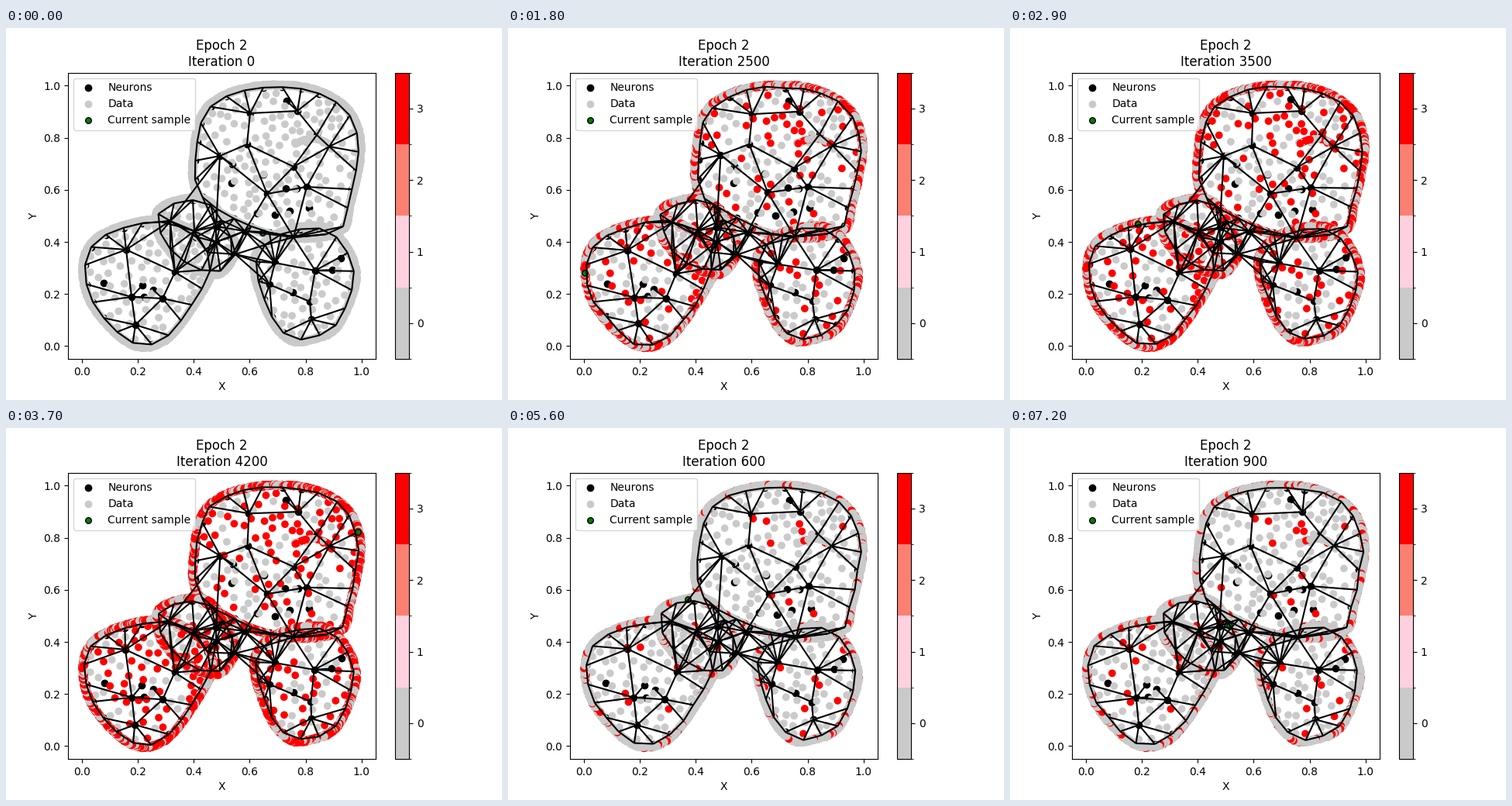
These frames come from a looping animation (640 by 480 pixels, 7300 ms). A matplotlib script:

```python
import numpy as np
import matplotlib.pyplot as plt
from matplotlib.animation import FuncAnimation
from matplotlib.cm import ScalarMappable
from matplotlib.collections import LineCollection
from matplotlib.colors import BoundaryNorm, ListedColormap, to_rgba
from matplotlib.path import Path

GRAY, RED = "#cacaca", "#ff0000"
TOTAL = 7300
rng = np.random.default_rng(4)


def pairs(text):
    return np.array([w.split(",") for w in text.split()], float)


# Key points in stage pixels.
BLOBS = [pairs(s) for s in (
    "250,220 242,155 258,102 310,76 385,75 440,102 459,152 446,225 428,266 340,268",
    "98,305 122,266 193,246 245,264 268,305 247,353 205,405 160,409 111,360",
    "193,238 222,221 262,222 290,262 297,290 274,319 230,306 200,275",
    "319,300 350,264 408,255 440,281 453,325 430,384 400,402 364,403 335,365",
)]
HUBS = pairs("276,165 315,110 311,150 337,214 376,107 401,138 417,153 371,179 388,205 "
             "371,270 308,262 155,286 162,347 202,349 167,383 218,315 243,262 271,256 "
             "271,276 296,292 212,249 347,303 399,313 392,353 394,376 340,331")
STRAYS = pairs("291,200 292,176 332,189 361,207 375,207 366,236 347,241 324,239 362,94 "
               "391,232 178,347 190,338 176,332 126,329 370,341 421,312 432,297")


def to_data(p):
    """Stage pixels to axis units."""
    return np.stack([(p[..., 0] - 98.04) / 360.73, (410.4 - p[..., 1]) / 336], -1)


def distances(a, b):
    return np.linalg.norm(a[:, None] - b[None], axis=-1)


# ---- curves ----

def smooth_loop(pts, steps=30):
    """Closed Catmull-Rom curve."""
    b = pts[:, None]
    a, c, d = np.roll(b, 1, 0), np.roll(b, -1, 0), np.roll(b, -2, 0)
    t = np.linspace(0, 1, steps, endpoint=False)[None, :, None]
    curve = b + .5 * ((c - a) * t + (2 * a - 5 * b + 4 * c - d) * t**2
                      + (3 * b - a - 3 * c + d) * t**3)
    curve = curve.reshape(-1, 2)
    return np.vstack([curve, curve[:1]])


def arc_lengths(curve):
    return np.r_[0, np.cumsum(np.hypot(*np.diff(curve, axis=0).T))]


def at_lengths(curve, u):
    s = arc_lengths(curve)
    return np.stack([np.interp(u, s, curve[:, k]) for k in (0, 1)], -1)


def inset(p, curve, depth):
    inward = curve.mean(0) - p
    return p + depth * inward / np.linalg.norm(inward, axis=1, keepdims=True)


curves = [smooth_loop(b) for b in BLOBS]
lengths = np.array([arc_lengths(c)[-1] for c in curves])

# ---- data cloud: dense rims, sparse interiors ----


def dense_rim(curve, length, n):
    u = np.sort(rng.uniform(0, length, n))
    u = u[np.argsort(u + rng.normal(0, 3, n))]
    return inset(at_lengths(curve, u), curve, rng.uniform(0, 3, (n, 1)))


def sparse_inside(curve, gap=9.5, area_each=255):
    x, y = curve.T
    area = abs(np.sum(x[:-1] * y[1:] - x[1:] * y[:-1])) / 2
    center = curve.mean(0)
    inner = Path(center + (curve - center) * .91)
    found = []
    for p in rng.uniform(curve.min(0), curve.max(0), (5000, 2)):
        if len(found) >= area / area_each:
            break
        if inner.contains_point(p) and all(np.hypot(*(p - q)) > gap for q in found):
            found.append(p)
    return np.array(found)


def make_cloud():
    inside = np.vstack([sparse_inside(c) for c in curves])
    t = rng.uniform(-1, 1, 100)
    arc = np.stack([395 + 22 * t, 143 + 7 * t**2], -1)
    left = TOTAL - len(inside) - len(arc)
    ends = np.round(np.cumsum(lengths) / lengths.sum() * left).astype(int)
    counts = np.diff(ends, prepend=0)
    rims = [dense_rim(*args) for args in zip(curves, lengths, counts)]
    return np.vstack([inside, arc, *rims])


cloud = make_cloud()
visit = rng.permutation(TOTAL)  # iteration at which each point is sampled

# ---- neuron graph ----


def hub_links():
    """Gabriel graph: no third hub inside the circle spanned by a link."""
    sq = distances(HUBS, HUBS) ** 2
    return [(i, j) for i in range(len(HUBS)) for j in range(i)
            if not np.any(np.delete(sq[i] + sq[j], [i, j]) < sq[i, j])]


def make_graph():
    nodes, links = [HUBS, STRAYS], hub_links()
    first = len(HUBS)
    d = distances(STRAYS, HUBS)
    links += [(first + i, row.argmin()) for i, row in enumerate(d) if row.min() < 25]
    first += len(STRAYS)
    for curve, length in zip(curves, lengths):
        n = round(length / 26)
        ring = inset(at_lengths(curve, np.arange(n) * length / n), curve, 4)
        for i, row in enumerate(distances(ring, HUBS)):
            links.append((first + i, first + (i + 1) % n))
            near = set(np.flatnonzero(row < 42)) | {row.argmin()}
            links += [(first + i, h) for h in near]
        nodes.append(ring)
        first += n
    return np.vstack(nodes), np.array(links)


home, edges = make_graph()
phase = rng.uniform(0, 2 * np.pi, home.shape)
rate = 1 / rng.uniform(400, 800, home.shape)


def neurons_at(it):
    """Neurons sway slowly around their places."""
    return to_data(home + np.sin(rate * it + phase) - np.sin(phase))


# ---- figure ----

fig, ax = plt.subplots(figsize=(6.4, 4.8), dpi=100)
neurons = ax.scatter(*neurons_at(0).T, color="black", label="Neurons")
points = ax.scatter(*to_data(cloud).T, color=GRAY, label="Data")
sample = ax.scatter([], [], s=30, c="green", edgecolors="black",
                    linewidths=1, label="Current sample")
links = LineCollection([], colors="black", linewidths=1.5, zorder=2)
ax.add_collection(links, autolim=False)
ax.set(xlim=(-.05, 1.05), ylim=(-.05, 1.05), xlabel="X", ylabel="Y")
ax.legend(loc="upper left")
title = ax.set_title("Epoch 2\nIteration 0")

cmap = ListedColormap([GRAY, "#ffd1df", "salmon", RED])
norm = BoundaryNorm(np.arange(-.5, 4), 4)
fig.colorbar(ScalarMappable(norm, cmap), ax=ax, ticks=range(4))

# Iterations play in alphabetical order: 0, 100, 1000, 1100, ...
ITERATIONS = sorted(range(0, TOTAL, 100), key=str)
SHADES = np.array([to_rgba(GRAY), to_rgba(RED)])


def update(frame):
    it = ITERATIONS[frame]
    pos = neurons_at(it)
    neurons.set_offsets(pos)
    links.set_segments(pos[edges])
    points.set_color(SHADES[(visit < it).astype(int)])
    sample.set_offsets(to_data(cloud[visit == it]))
    title.set_text(f"Epoch 2\nIteration {it}")
    return neurons, points, sample, links, title


anim = FuncAnimation(fig, update, frames=len(ITERATIONS), interval=100,
                     repeat=True, repeat_delay=0)
plt.show()
```
